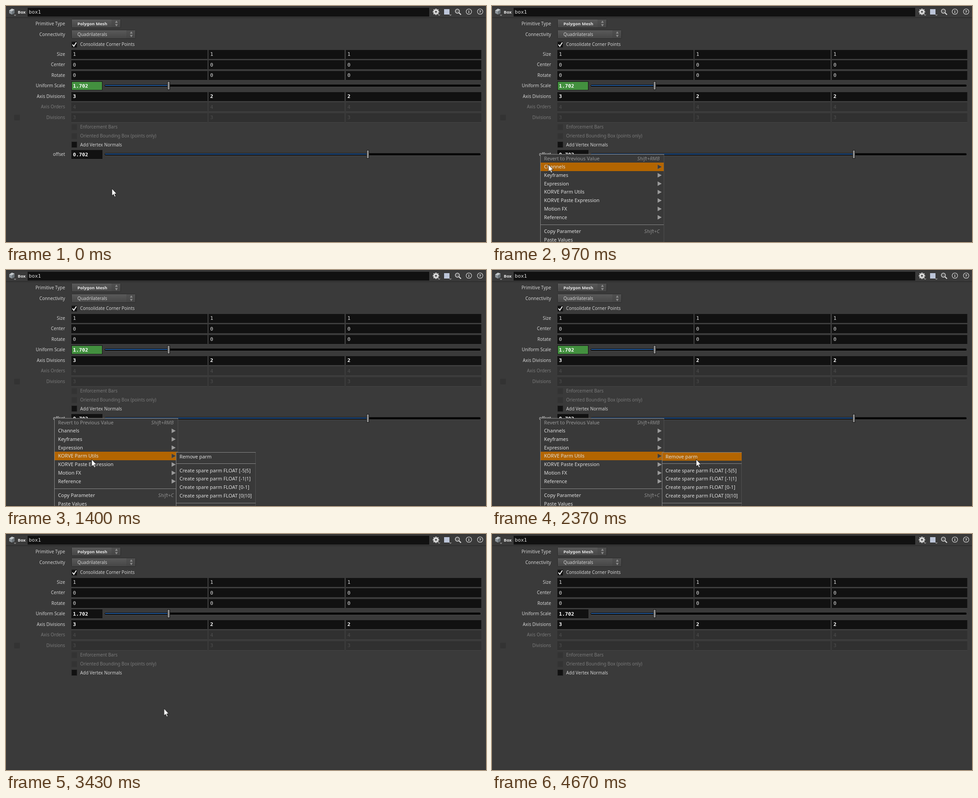
These frames come from a looping animation (1065 px wide and 526 px high, 5.73 s). An HTML page:

```html
<!DOCTYPE html>
<html lang="en">
<head>
<meta charset="utf-8">
<title>Parameter panel</title>
<style>
  html, body { margin: 0; width: 100%; height: 100%; overflow: hidden; background: #3a3a3a; }
  svg { display: block; width: 1065px; height: 526px; }
  text { font: 9.9px "Noto Sans", "Open Sans", sans-serif; fill: #d2d2d2; white-space: pre; }
  .end { text-anchor: end; }
  .bold { font-weight: 600; font-size: 9.5px; fill: #e4e4e4; }
  .mono { font: 11.2px "DejaVu Sans Mono", "Noto Sans Mono", monospace; fill: #dedede; }
  .strong { font-weight: 700; fill: #fff; }
  .dim { fill: #7a7a7a; }
  .mono.dim { fill: #4e4e4e; }
  .item { font-size: 10.85px; fill: #e0e0e0; }
  .off { fill: #989898; }
  .key { font-style: italic; text-anchor: end; fill: #8c8c8c; }
  .pipe { font-family: "Liberation Sans", sans-serif; }

  .cursor, .menu, .sub, .hover, .subHover, .linked { animation: 5730ms infinite step-end; }
  .cursor { animation-name: cursor; animation-timing-function: linear; }
  .menu { animation-name: menu; }
  .sub { animation-name: sub; }
  .hover { animation-name: hover; }
  .subHover { animation-name: subHover; }
  .linked { animation-name: linked; }

  @keyframes cursor {
    0% { transform: translate(235px, 407px); }
    .52% { transform: translate(235px, 407px); animation-timing-function: ease-in-out; }
    10.47%, 12.74% { transform: translate(107px, 330px); }
    16.93% { transform: translate(125px, 353px); animation-timing-function: ease-out; }
    22.69% { transform: translate(190px, 422px); }
    35.43% { transform: translate(190px, 422px); animation-timing-function: ease-in-out; }
    41.36% { transform: translate(453px, 422px); }
    57.59% { transform: translate(453px, 422px); animation-timing-function: ease-in; }
    59.86% { transform: translate(351px, 389px); }
    61.6% { transform: translate(303px, 381px); }
    63.6% { transform: translate(262px, 412px); animation-timing-function: ease-out; }
    67.54%, 68.06% { transform: translate(234px, 478px); }
    72.08% { transform: translate(162px, 473px); }
    74% { transform: translate(98px, 480px); animation-timing-function: ease-out; }
    76.79%, 78.53% { transform: translate(50px, 510px); }
    81.4%, 99.99% { transform: translate(41px, 530px); }
    100% { transform: translate(235px, 407px); }
  }
  @keyframes menu {
    0%, 47.12%, 100% { visibility: hidden; }
    12.74% { visibility: visible; }
  }
  @keyframes sub {
    0%, 47.12%, 100% { visibility: hidden; }
    22.4% { visibility: visible; }
  }
  @keyframes hover {
    0%, 47.12%, 100% { visibility: hidden; transform: none; }
    15.88% { visibility: visible; transform: none; }
    17.71% { visibility: visible; transform: translateY(19px); }
    18.76% { visibility: visible; transform: translateY(38px); }
    19.98% { visibility: visible; transform: translateY(56px); }
  }
  @keyframes subHover {
    0%, 47.12%, 100% { visibility: hidden; }
    39.1% { visibility: visible; }
  }
  @keyframes linked {
    0% { visibility: visible; }
    49.39%, 100% { visibility: hidden; }
  }
</style>
</head>
<body>
<svg id="stage" viewBox="0 0 1065 526">
  <defs>
    <linearGradient id="button" x2="0" y2="1">
      <stop stop-color="#5a5a5a"/><stop offset="1" stop-color="#464646"/>
    </linearGradient>
    <linearGradient id="knob" x2="1" y2="0">
      <stop stop-color="#a8a8a8"/><stop offset="1" stop-color="#6c6c6c"/>
    </linearGradient>
  </defs>
</svg>
<script>
const rect = (x, y, w, h, fill, extra = "") =>
  `<rect x="${x}" y="${y}" width="${w}" height="${h}" fill="${fill}" ${extra}/>`;
const text = (x, y, str, cls = "") => `<text x="${x}" y="${y}" class="${cls}">${str}</text>`;
const path = (d, fill, extra = "") => `<path d="${d}" fill="${fill}" ${extra}/>`;
const label = (y, str, cls = "") => text(131, y + 3.6, str, "end " + cls);
const downArrow = (x, y) => path(`M${x - 3} ${y}h6l-3 3z`, "#8c8c8c");

function field(x, y, w, str, cls = "", fill = "#111", tint = "") {
  const top = Math.round(y - 9.5);
  return rect(x, top, w, 20, fill) + rect(x, top + 20, w, 1, "#454545") +
    (tint && `<g class="linked">${rect(x + 1, top + 1, w - 2, 18, tint)}</g>`) +
    text(x + 3.5, y + 4, str, "mono " + cls);
}

function vector(y, name, values, cls = "", fill) {
  return label(y, name, cls == "dim" ? "dim" : "") +
    [[145, 302], [449.5, 301.5], [754, 300.5]]
      .map(([x, w], i) => field(x, y, w, values[i], cls, fill)).join("");
}

function slider(y, x) {
  return rect(219, y - 2.5, 834, 5, "#080808", 'rx="2.5"') +
    path(`M220 ${y + 3}H1052`, "none", 'stroke="#484848"') +
    rect(220, y - 1.5, x - 220, 2, "#235b9f") +
    rect(x - 2.5, y - 9, 5, 18, "url(#knob)", 'stroke="#161616"');
}

function dropdown(y, w, str, cls) {
  const right = 145 + w, mid = right - 10;
  return rect(145.5, y - 9.5, w - 1, 19, "url(#button)", 'stroke="#2a2a2a" rx="1"') +
    rect(right - 21, y - 9, 20, 18, "#3f3f3f", 'fill-opacity=".35"') +
    path(`M${mid - 3} ${y - 1.5}h6l-3-5zM${mid - 3} ${y + 1.5}h6l-3 5z`, "#8e8e8e") +
    text(158.5, y + 3.5, str, cls);
}

function check(y, str, cls = "", on = false) {
  return rect(145.5, Math.round(y) - 6.5, 12, 13, cls ? "#333" : "#111", `stroke="${cls ? "#373737" : "#2b2b2b"}"`) +
    (on ? path(`M147.5 ${y}l3 4 5.5-8.5`, "none", 'stroke="#fff" stroke-width="2"') : "") +
    text(164.5, y + 3.6, str, cls);
}

function header() {
  const teeth = Array.from({ length: 8 }, (_, i) =>
    `<rect x="952.7" y="6" width="2.6" height="14" fill="#ddd" transform="rotate(${i * 45} 954 13)"/>`).join("");
  const badge = (x, str) =>
    `<circle cx="${x}" cy="12.5" r="6" fill="none" stroke="#d6d6d6" stroke-width="1.2"/>` +
    `<text x="${x}" y="16.2" text-anchor="middle" class="bold">${str}</text>`;
  return path("M0 1.5H1065", "none", 'stroke="#2e2e2e"') +
    path("M0 26H1065", "none", 'stroke="#2b2b2b" stroke-width="1.5"') +
    path("M7 10l6-4 6 2v8l-6 3-6-3z", "#8d959b") +
    path("M7 10l6-4 6 2-6 4z", "#c3c8cb") +
    path("M13 12l6-4v8l-6 3z", "#6d757a") + downArrow(20, 19.5) +
    text(26, 16.6, "Box", "bold") +
    rect(48, 4, 891, 19.5, "#111") + text(50.5, 17, "box1", "mono") +
    teeth + '<circle cx="954" cy="13" r="4.7" fill="#ddd"/><circle cx="954" cy="13" r="2" fill="#3a3a3a"/>' +
    downArrow(961, 19) + rect(972, 7, 12, 12, "#bcc5d8") + downArrow(986, 19) +
    '<circle cx="1001.5" cy="11.5" r="4.5" fill="#555" stroke="#d6d6d6" stroke-width="1.5"/>' +
    path("M1005 15l4.5 4.5", "none", 'stroke="#d6d6d6" stroke-width="2.4"') +
    badge(1027, "i") + badge(1052, "?");
}

function panel() {
  return label(39.5, "Primitive Type") + dropdown(39, 110, "Polygon Mesh", "bold") +
    label(63.5, "Connectivity") + dropdown(63, 143, "Quadrilaterals", "") +
    check(85.8, "Consolidate Corner Points", "", true) +
    vector(107.3, "Size", [1, 1, 1]) +
    vector(130.8, "Center", [0, 0, 0]) +
    vector(154.2, "Rotate", [0, 0, 0]) +
    label(177.8, "Uniform Scale") +
    field(145, 177.8, 69, "1.702", "strong", "#111", "#43903f") + slider(177.5, 361) +
    vector(201.2, "Axis Divisions", [3, 2, 2], "strong") +
    vector(224.7, "Axis Orders", [4, 4, 4], "dim", "#303030") +
    vector(248, "Divisions", [3, 3, 3], "dim", "#303030") +
    rect(18, 242.5, 13, 12.5, "#333") +
    check(269.8, "Enforcement Bars", "dim") +
    check(289.5, "Oriented Bounding Box (points only)", "dim") +
    check(309.3, "Add Vertex Normals") +
    `<g class="linked">${label(330.8, "offset") + field(145, 330.8, 69, "0.702", "strong") + slider(330.5, 803)}</g>` +
    path("M0 525H1065", "none", 'stroke="#2e2e2e"');
}

const arrow = (y, fill) => path(`M367.5 ${y - 5}v10l9-5z`, fill);
const rule = (y, x1, x2) => path(`M${x1} ${y}H${x2}`, "none", 'stroke="#8a8a8a"');

// Popup frame: lit on the top and left, dark on the right.
const popup = (x, y, w) =>
  rect(x, y, w, 200, "#393939") +
  path(`M${x + w - .5} ${y}v200`, "none", 'stroke="#505050"') +
  path(`M${x + .5} ${y + 200}V${y + .5}h${w - .5}`, "none", 'stroke="#888"');

function menu() {
  const groups = ["Channels", "Keyframes", "Expression", "KORVE Parm Utils",
    "KORVE Paste Expression", "Motion FX", "Reference"];
  const rows = groups.map((name, i) => {
    const y = 358.4 + i * 18.75;
    return text(115.5, y + 3.8, name, "item") + arrow(y, "#9c9c9c");
  }).join("");
  return `<g class="menu">${popup(107, 330, 275)}</g>` +
    `<g class="hover">${rect(108, 349, 273, 19, "#b36500")}</g>` +
    `<g class="menu">` +
    text(115.5, 343.5, "Revert to Previous Value", "item off") + text(372, 343.5, "Shift+RMB", "item key") +
    rows + rule(487.5, 108, 381) +
    text(115.5, 506, "Copy Parameter", "item") + text(372, 506, "Shift+C", "item key") +
    text(115.5, 524.8, "Paste Values", "item") + `</g>` +
    `<g class="hover">${arrow(358.4, "#3c3c3c")}</g>`;
}

function submenu() {
  const ranges = ["[-5|5]", "[-1|1]", "[0-1]", "[0|10]"].map((range, i) =>
    text(385, 450.5 + i * 18.75, "Create spare parm FLOAT " +
      range.replace("|", '<tspan class="pipe">|</tspan>'), "item")).join("");
  return `<g class="sub">${popup(377, 406, 177)}</g>` +
    `<g class="subHover">${rect(378, 407, 176, 18, "#b36500")}</g>` +
    `<g class="sub">${text(385, 419.5, "Remove parm", "item") +
      rule(431.5, 378, 554) + ranges + rule(519.5, 378, 554)}</g>`;
}

const cursor = `<g class="cursor">${path("M0 0V16L3.6 12.7 6 18.4 8.5 17.3 6.1 11.8H10.8Z",
  "#fff", 'stroke="#111" stroke-width=".9"')}</g>`;

document.getElementById("stage").insertAdjacentHTML("beforeend",
  header() + panel() + menu() + submenu() + cursor);
</script>
</body>
</html>
```
